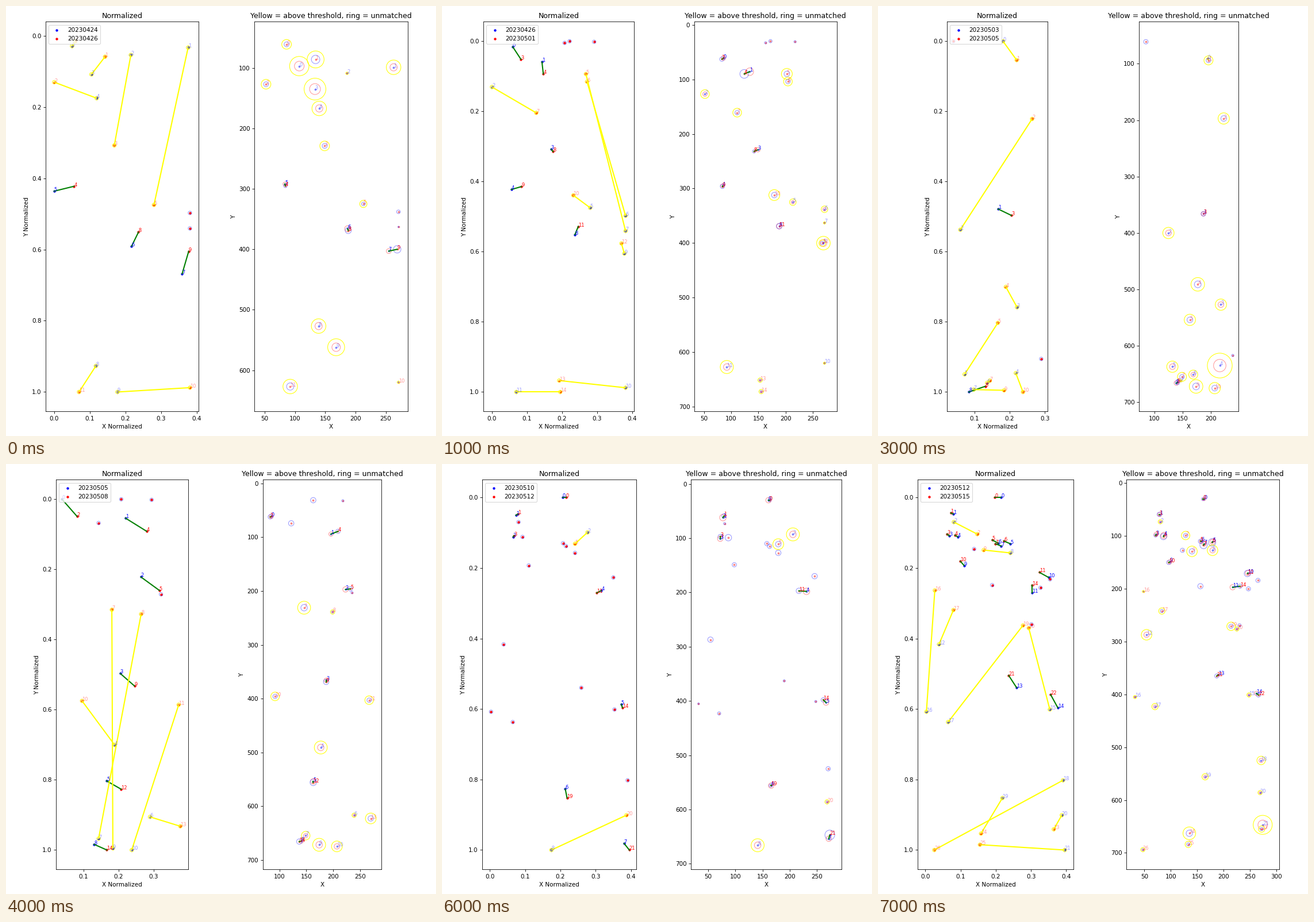
Recreate the animation shown at these times as a matplotlib script. Size 748 by 748 pixels, loop 8000 ms.

```python
from itertools import product

import matplotlib.pyplot as plt
import numpy as np
from matplotlib.animation import FuncAnimation
from matplotlib.ticker import MultipleLocator

NEAR = 14.4      # largest raw distance of a good match
RING = 0.005     # ring radius in the normalized view


class Session:
    """Spots of one day as (x, y, radius), scaled by their common range."""

    def __init__(self, date, *spots):
        self.date = date
        data = np.array(spots, float)
        self.raw, self.radius = data[:, :2], data[:, 2]
        low, high = self.raw.min(), self.raw.max()
        self.norm = (self.raw - low) / (high - low)


SESSIONS = [
    Session("20230424", (107, 97, 8), (263, 99, 6), (186, 109, 1),
            (133, 135, 9), (140, 167, 6), (83, 292, 3), (187, 366, 5),
            (255, 403, 4), (139, 527, 6), (168, 562, 7)),
    Session("20230426", (86, 61, 4), (134, 86, 7), (52, 127, 4), (149, 229, 4),
            (84, 295, 3), (213, 325, 3), (271, 338, 3), (271, 363, 1),
            (188, 369, 5), (269, 400, 6.2), (271, 620, 1), (92, 627, 6)),
    Session("20230501", (172, 30, 3), (217, 31, 2), (163, 33, 2), (83, 63, 4),
            (124, 90, 8), (202, 90, 5), (204, 104, 4), (111, 161, 4),
            (142, 232, 3), (84, 296, 4), (179, 312, 5), (188, 369, 5),
            (267, 400, 3), (153, 651, 2), (155, 672, 2)),
    Session("20230503", (195, 91, 1), (187, 366, 4), (125, 400, 5),
            (218, 527, 5), (216, 635, 11), (132, 637, 5), (169, 651, 4),
            (147, 662, 1), (139, 666, 4)),
    Session("20230505", (85, 61, 4), (196, 94, 4), (223, 197, 5),
            (187, 366, 4), (177, 491, 6), (163, 554, 5), (239, 617, 2),
            (149, 655, 4), (141, 665, 4), (174, 672, 6), (207, 675, 5)),
    Session("20230508", (163, 31, 5), (218, 32, 2), (83, 62, 4), (122, 74, 5),
            (209, 89, 4), (232, 196, 4), (235, 203, 2), (146, 231, 6),
            (199, 239, 2), (187, 369, 5), (92, 396, 4), (267, 403, 4),
            (163, 556, 6), (270, 623, 5), (137, 666, 5)),
    Session("20230510", (161, 30, 5), (77, 62, 6), (206, 93, 6), (72, 101, 5),
            (231, 198, 6), (267, 403, 5), (166, 556, 5), (272, 654, 5),
            (141, 666, 6)),
    Session("20230512", (163, 30, 3), (79, 59, 4), (80, 73, 2), (72, 97, 4),
            (87, 99, 6), (179, 111, 5), (158, 110, 4), (163, 115, 4),
            (179, 127, 5), (98, 149, 4), (246, 170, 5), (217, 197, 5),
            (54, 287, 5), (190, 363, 2), (262, 398, 4), (248, 401, 2),
            (32, 405, 1.5), (70, 423, 3), (271, 525, 4), (165, 556, 3),
            (269, 586, 2), (274, 647, 9)),
    Session("20230515", (161, 30, 3), (78, 59, 4), (128, 99, 4), (71, 99, 3),
            (86, 101, 6), (156, 110, 4), (178, 112, 7), (162, 117, 7),
            (122, 127, 4), (140, 129, 5), (96, 150, 4), (245, 171, 6),
            (265, 184, 4), (156, 195, 5), (231, 195, 4), (247, 200, 4),
            (48, 205, 1), (83, 242, 3), (230, 269, 3), (214, 271, 4),
            (225, 276, 2), (187, 365, 4), (266, 401, 4), (272, 655, 3),
            (135, 663, 6), (133, 684, 3), (47, 694, 2)),
]


def distances(a, b):
    return np.linalg.norm(a[:, None] - b[None], axis=2)


def pick_closest(dist, allowed, taken):
    """Link free spots greedily, the shortest allowed link first."""
    links = {}
    for i, j in sorted(product(*map(range, dist.shape)), key=lambda p: dist[p]):
        if allowed[i, j] and i not in taken and j not in taken.values():
            links[i] = taken[i] = j
    return links


def match(old, new):
    """Good links in raw space first, the remaining ones in normalized space."""
    taken = {}
    raw = distances(old.raw, new.raw)
    a, b = old.radius[:, None], new.radius[None]
    alike = np.maximum(a, b) <= 2 * np.minimum(a, b)
    near = pick_closest(raw, (raw < NEAR) & alike, taken)
    far = pick_closest(distances(old.norm, new.norm), np.ones_like(alike), taken)
    return near, far


def circle(ax, point, radius, color, alpha=1):
    ax.add_patch(plt.Circle(point, radius, fill=False, ec=color, alpha=alpha))


def draw_links(ax, a, b, links, color):
    for i, j in links.items():
        ax.plot(*zip(a[i], b[j]), color=color, lw=2)


def draw_labels(ax, points, good, poor, color):
    for group, alpha in ((good, 1), (poor, 0.4)):
        for i in group:
            ax.annotate(str(i), points[i], color=color, fontsize=8, alpha=alpha)


def finish(ax, title, labels, steps):
    ax.set_title(title)
    ax.set_xlabel(labels[0])
    ax.set_ylabel(labels[1])
    ax.xaxis.set_major_locator(MultipleLocator(steps[0]))
    ax.yaxis.set_major_locator(MultipleLocator(steps[1]))
    ax.set_aspect("equal")
    ax.autoscale_view()
    ax.invert_yaxis()


def draw_norm(ax, old, new, near, far, sides):
    for ses, color, other, good, poor in sides:
        ax.scatter(*ses.norm.T, s=10, color=color, label=ses.date)
        for i, point in enumerate(ses.norm):
            if i in poor:
                circle(ax, point, RING, "yellow")
            elif i not in good:
                circle(ax, point, RING, other, 0.4)
        draw_labels(ax, ses.norm, good, poor, color)
    draw_links(ax, old.norm, new.norm, near, "green")
    draw_links(ax, old.norm, new.norm, far, "yellow")
    ax.legend(loc="upper left")
    finish(ax, "Normalized", ("X Normalized", "Y Normalized"), (0.1, 0.2))


def draw_raw(ax, old, new, near, far, sides):
    for ses, color, other, good, poor in sides:
        ax.scatter(*ses.raw.T, s=7, color=color, alpha=0.4, lw=1)
        for i, (point, r) in enumerate(zip(ses.raw, ses.radius)):
            circle(ax, point, r, other, 0.4)
            if i in poor:
                circle(ax, point, 2 * r, "yellow")
        draw_labels(ax, ses.raw, good, poor, color)
    draw_links(ax, old.raw, new.raw, near, "green")
    finish(ax, "Yellow = above threshold, ring = unmatched", ("X", "Y"), (50, 100))


fig = plt.figure(figsize=(10, 10), dpi=74.8, facecolor="white")


def draw(step):
    fig.clear()
    # tight_layout starts from the current margins, so restore them first
    fig.subplots_adjust(0.125, 0.11, 0.9, 0.88, 0.2, 0.2)
    left, right = fig.subplots(1, 2)
    old, new = SESSIONS[step:step + 2]
    near, far = match(old, new)
    sides = [(old, "blue", "red", list(near), list(far)),
             (new, "red", "blue", list(near.values()), list(far.values()))]
    draw_norm(left, old, new, near, far, sides)
    draw_raw(right, old, new, near, far, sides)
    fig.tight_layout()
    return []


anim = FuncAnimation(fig, draw, frames=len(SESSIONS) - 1, interval=1000,
                     init_func=lambda: [], repeat=True, repeat_delay=0)
plt.show()
```
